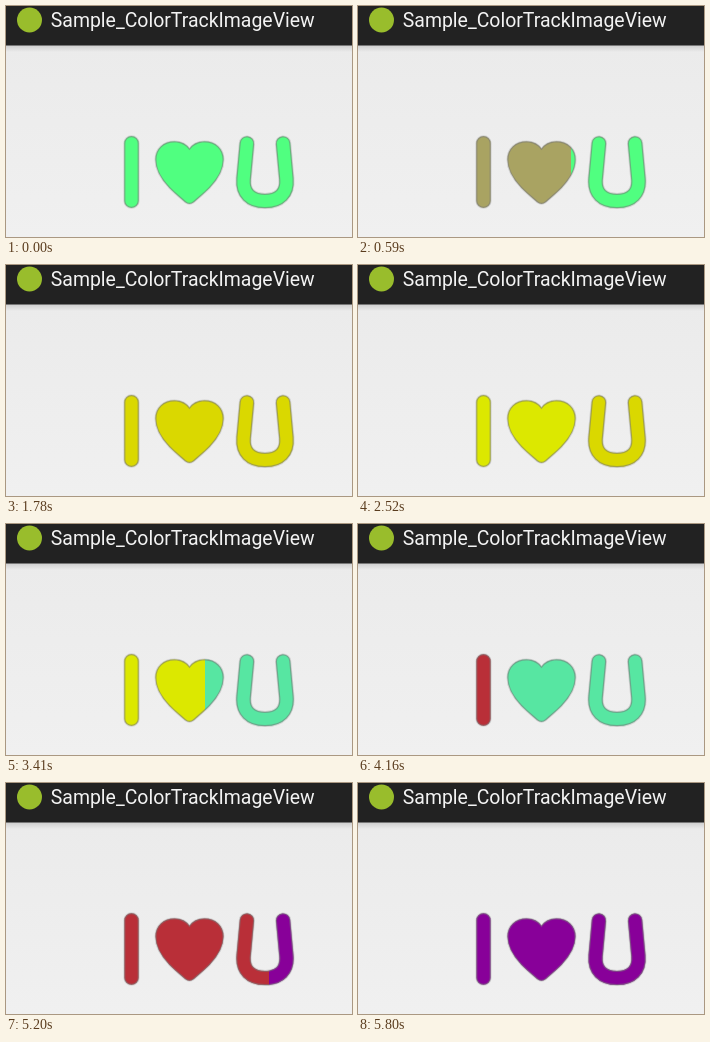
Recreate the animation shown at these times as an HTML page with a canvas. Size 346 by 231 pixels, loop 5970 ms.

```html
<!DOCTYPE html>
<html lang="en">
<head>
<meta charset="utf-8">
<title>Colour track</title>
<style>
html, body { margin: 0; width: 100%; height: 100%; overflow: hidden; background: #ececec; }
canvas { display: block; width: 346px; height: 231px; }
</style>
</head>
<body>
<canvas id="stage"></canvas>
<script>
const W = 346, H = 231, LOOP = 5970;
const LEFT = 118, RIGHT = 288;
const STEP_MS = 145, STEP = 0.22, STEPS = 5;
const FIRST_COLOR = '#50ff80';

// Each sweep starts at `first` of the width and moves on in even steps.
const sweeps = [
  { at: 300, color: '#a9a362', first: 0.12, dir: 1 },
  { at: 1190, color: '#dad800', first: 0.10, dir: -1 },
  { at: 2230, color: '#dce800', first: 0.16, dir: 1 },
  { at: 3120, color: '#57e6a2', first: 0.085, dir: -1 },
  { at: 4160, color: '#b92f38', first: 0.13, dir: 1 },
  { at: 5200, color: '#880099', first: 0.147, dir: -1 }
];

const bars = new Path2D(
  'M125.5 137.3V194.7' +
  'M240.9 137.5L237.6 173C236.4 187 244.5 195 259 195' +
  'S281.6 187 280.4 173L277.1 137.5');
const heart = new Path2D(
  'M183.5 144.3C180 139 174 136.5 168.5 136.5' +
  'C158 136.5 150.5 143.5 150.5 153.5C150.5 164 156 172.5 164 181' +
  'C170 187 175 191 179.8 195.3Q183.5 198.3 187.2 195.3' +
  'C192 191 197 187 203 181C211 172.5 216.5 164 216.5 153.5' +
  'C216.5 143.5 209 136.5 198.5 136.5C193 136.5 187 139 183.5 144.3Z');

const canvas = document.getElementById('stage');
const ctx = canvas.getContext('2d');
const dpr = window.devicePixelRatio || 1;
canvas.width = Math.round(W * dpr);
canvas.height = Math.round(H * dpr);
ctx.scale(dpr, dpr);
ctx.lineCap = ctx.lineJoin = 'round';

function gradient(y0, y1, from, to) {
  const g = ctx.createLinearGradient(0, y0, 0, y1);
  g.addColorStop(0, from);
  g.addColorStop(1, to);
  return g;
}

const pageFill = gradient(40, H, '#ebebeb', '#f0f0f0');
const shadowFill = gradient(39, 46, 'rgba(0,0,0,.13)', 'rgba(0,0,0,0)');

function strokePath(path, color, width) {
  ctx.strokeStyle = color;
  ctx.lineWidth = width;
  ctx.stroke(path);
}

function drawPage() {
  ctx.fillStyle = pageFill;
  ctx.fillRect(0, 0, W, H);
  ctx.fillStyle = shadowFill;
  ctx.fillRect(0, 39, W, 7);
  ctx.fillStyle = '#222';
  ctx.fillRect(0, 0, W, 39.5);

  ctx.fillStyle = '#99bd2c';
  ctx.beginPath();
  ctx.arc(23.5, 14, 12.5, 0, Math.PI * 2);
  ctx.fill();

  ctx.fillStyle = '#f3f3f3';
  ctx.font = '19.45px Roboto, sans-serif';
  ctx.fillText('Sample_ColorTrackImageView', 44.8, 21.4);
}

// Strokes the rim, reaching `out` pixels past the coloured body.
function drawRim(color, out) {
  strokePath(bars, color, 12.2 + 2 * out);
  strokePath(heart, color, 2 * out);
}

function drawShapes(color, from, to) {
  if (to <= from) return;
  ctx.save();
  ctx.beginPath();
  ctx.rect(from, 120, to - from, 95);
  ctx.clip();
  drawRim('rgba(120,120,120,.25)', 2);
  drawRim(color, 1);
  drawRim('rgba(120,120,120,.55)', 1.2);
  strokePath(bars, color, 12.2);
  ctx.fillStyle = color;
  ctx.fill(heart);
  ctx.restore();
}

function draw(t) {
  drawPage();
  let i = sweeps.length - 1;
  while (i >= 0 && t < sweeps[i].at) i--;
  if (i < 0) {
    drawShapes(FIRST_COLOR, 0, W);
    return;
  }
  const s = sweeps[i];
  const before = i ? sweeps[i - 1].color : FIRST_COLOR;
  const step = Math.floor((t - s.at) / STEP_MS);
  if (step >= STEPS - 1) {
    drawShapes(s.color, 0, W);
    return;
  }
  const shift = (s.first + step * STEP) * (RIGHT - LEFT);
  const edge = Math.round(s.dir > 0 ? LEFT + shift : RIGHT - shift);
  drawShapes(s.dir > 0 ? s.color : before, 0, edge);
  drawShapes(s.dir > 0 ? before : s.color, edge, W);
}

const start = performance.now();
function tick() {
  draw((performance.now() - start) % LOOP);
  requestAnimationFrame(tick);
}
tick();
</script>
</body>
</html>
```
